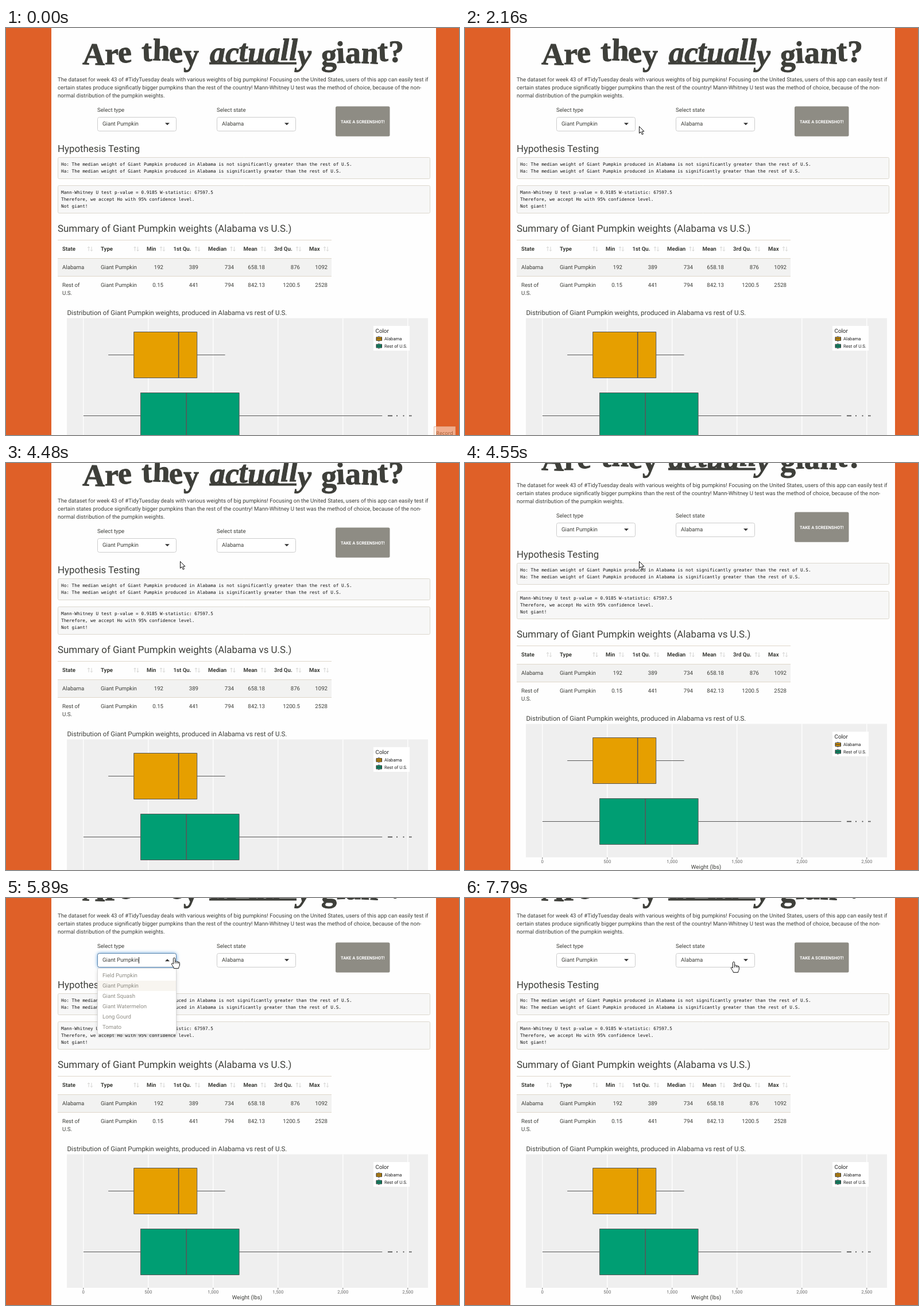
Animation, 789 px wide and 709 px high, one loop 7.99 s. Source, as an HTML page with a canvas:

```html
<!DOCTYPE html>
<html lang="en">
<head>
<meta charset="utf-8">
<title>Are they actually giant?</title>
<style>
  html, body { margin: 0; width: 100%; height: 100%; overflow: hidden; background: #df6028; }
  canvas { display: block; }
</style>
</head>
<body>
<canvas id="stage" width="789" height="709"></canvas>
<script>
const ctx = document.getElementById('stage').getContext('2d');
const LOOP = 7990, STEP = 67;
const INK = '#3e3f3a', RULE = '#dfd7ca', EDGE = '#585858';
const SANS = 'Roboto, sans-serif', MONO = '"DejaVu Sans Mono", monospace';
const BODY = `9.67px ${SANS}`, BOLD = `bold 9.67px ${SANS}`;
const AMBER = '#e69f00', GREEN = '#009e73';

// time, x, y, pointer kind
const POINTER = [
  [530, 772, 699], [640, 764, 696], [800, 764, 696], [1000, 681, 587],
  [1400, 681, 587], [1670, 310, 440], [1870, 100, 262], [2020, 215, 186], [2150, 303, 171],
  [4760, 303, 171], [5030, 309, 87], [5170, 309, 87], [5300, 303, 98],
  [5430, 303, 98], [5490, 293, 104, 'hand'], [6300, 293, 104], [6570, 321, 107],
  [7180, 321, 107], [7380, 363, 107], [7520, 363, 107], [7590, 395, 108, 'hand'], [7780, 468, 111, 'hand']
];
const SCROLL = [[0, 0], [4410, 1], [4480, 24], [4550, 51], [4620, 57], [4690, 59]];

const ARROW = new Path2D('M.5 .5V12.4L3.2 9.8 5.4 14.6 7.4 13.7 5.3 9.1H9Z');
const HAND = new Path2D('M-1.6 11V1.6Q-1.6 .3 0 .3T1.6 1.6V6.4Q3.8 5.4 4.6 7 6.4 6.2 7.2 7.8 9.4 7.2 9.4 9.4V13C9.4 15 7.6 16 7.6 18.7H-.6C-.6 16.6-3.4 14-4.6 11.2-4.9 9.4-3.2 9.3-1.6 11Z');
const KNUCKLES = new Path2D('M1.6 6.4V10M4.6 7V10M7.2 7.8V10.4');

const clamp = v => Math.max(0, Math.min(1, v));
const weightX = lbs => 134.8 + lbs * .226;

function text(s, x, y, font = BODY, color = INK, align = 'left') {
  ctx.font = font;
  ctx.fillStyle = color;
  ctx.textAlign = align;
  ctx.fillText(s, x, y);
}

function rect(x, y, w, h, fill, stroke, r = 0) {
  ctx.beginPath();
  ctx.roundRect(x, y, w, h, r);
  if (fill) { ctx.fillStyle = fill; ctx.fill(); }
  if (stroke) { ctx.strokeStyle = stroke; ctx.stroke(); }
}

function line(x1, y1, x2, y2, color, width = 1) {
  ctx.beginPath();
  ctx.moveTo(x1, y1);
  ctx.lineTo(x2, y2);
  ctx.strokeStyle = color;
  ctx.lineWidth = width;
  ctx.stroke();
  ctx.lineWidth = 1;
}

function title() {
  const lift = { A: 2, r: 2, h: -5, l: -5, t: -3, y: 4, g: 4, '?': -2 };
  const tilt = { A: .04, e: -.08, h: .03, n: .05, t: -.04, i: -.05 };
  const words = [['Are', 133], ['they', 237], ['actually', 355, 'italic '], ['giant?', 549]];
  ctx.strokeStyle = INK;
  for (const [word, left, style = ''] of words) {
    let x = left;
    for (const c of word) {
      ctx.save();
      ctx.translate(x, 61 + (lift[c] || 0));
      ctx.rotate(tilt[c] || 0);
      text(c, 0, 0, `${style}bold 54px "Liberation Serif", serif`);
      ctx.strokeText(c, 0, 0);
      x += ctx.measureText(c).width;
      ctx.restore();
    }
  }
  rect(354, 59.5, 152, 4, INK);
}

function intro() {
  [
    'The dataset for week 43 of #TidyTuesday deals with various weights of big pumpkins! Focusing on the United States, users of this app can easily test if',
    'certain states produce significatly bigger pumpkins than the rest of the country! Mann-Whitney U test was the method of choice, because of the non-',
    'normal distribution of the pumpkin weights.'
  ].forEach((s, i) => text(s, 90, 93 + i * 14));
}

function select(x, label, value, glow, open) {
  text(label, x, 146);
  if (glow) {
    ctx.save();
    ctx.shadowColor = `rgba(80,150,215,${glow})`;
    ctx.shadowBlur = 6;
    rect(x + .5, 155.5, 137, 24, '#fff', null, 3);
    ctx.restore();
  }
  rect(x + .5, 155.5, 137, 24, '#fff', '#cccccc', 3);
  if (glow) {
    ctx.globalAlpha = glow;
    rect(x + .5, 155.5, 137, 24, null, '#5f88b0', 3);
    ctx.globalAlpha = 1;
  }
  text(value, x + 9, 170);
  const d = open ? -2 : 2;
  ctx.beginPath();
  ctx.moveTo(x + 118, 167.3 - d);
  ctx.lineTo(x + 126, 167.3 - d);
  ctx.lineTo(x + 122, 167.3 + d);
  ctx.fillStyle = '#333';
  ctx.fill();
}

function dropdown() {
  ctx.save();
  ctx.shadowColor = 'rgba(0,0,0,.16)';
  ctx.shadowBlur = 7;
  ctx.shadowOffsetY = 3;
  rect(159.5, 181.5, 137, 114.5, '#fff', null, 2);
  ctx.restore();
  rect(159.5, 181.5, 137, 114.5, '#fff', '#d8d8d8', 2);
  rect(160, 203, 136, 18, '#f8f5f0');
  ['Field Pumpkin', 'Giant Pumpkin', 'Giant Squash', 'Giant Watermelon', 'Long Gourd', 'Tomato']
    .forEach((s, i) => text(s, 168, 197 + i * 18, BODY, '#8e8c84'));
}

function block(y, h, lines) {
  rect(90.5, y + .5, 648, h, '#f7f7f7', '#dcd8ce', 2);
  lines.forEach((s, i) => text(s, 96, y + 15 + Math.round(i * 12.2), `7.72px ${MONO}`, '#111'));
}

function tests() {
  text('Hypothesis Testing', 90, 216, `16.85px ${SANS}`);
  block(225, 37, [
    'Ho: The median weight of Giant Pumpkin produced in Alabama is not significantly greater than the rest of U.S.',
    'Ha: The median weight of Giant Pumpkin produced in Alabama is significantly greater than the rest of U.S.'
  ]);
  block(274, 48, [
    'Mann-Whitney U test p-value = 0.9185 W-statistic: 67597.5',
    'Therefore, we accept Ho with 95% confidence level.',
    'Not giant!'
  ]);
}

function sortIcon(x) {
  const c = '#c9c9c7';
  for (const [dx, tip, d] of [[2, 381, 2], [7, 388.5, -2]]) {
    line(x + dx, 381, x + dx, 388.5, c, .8);
    line(x + dx - 2, tip + d, x + dx, tip, c, .8);
    line(x + dx + 2, tip + d, x + dx, tip, c, .8);
  }
}

function table() {
  text('Summary of Giant Pumpkin weights (Alabama vs U.S.)', 90, 355, `16.92px ${SANS}`);
  rect(90, 402, 477, 30, '#f2f2f1');
  for (const y of [369.5, 401.5, 432.5]) line(90, y, 567, y, RULE);
  // heading, left, icon left, value right, two values
  [
    ['State', 98, 142, 0, 'Alabama', 'Rest of'],
    ['Type', 165, 222.5, 0, 'Giant Pumpkin', 'Giant Pumpkin'],
    ['Min', 245, 268, 274, '192', '0.15'],
    ['1st Qu.', 291.5, 329, 335, '389', '441'],
    ['Median', 352, 390.5, 397, '734', '794'],
    ['Mean', 413.5, 444, 451, '658.18', '842.13'],
    ['3rd Qu.', 467, 505, 512, '876', '1200.5'],
    ['Max', 528, 553, 560, '1092', '2528']
  ].forEach(([head, x, icon, right, a, b]) => {
    text(head, x, 388, BOLD);
    sortIcon(icon);
    const align = right ? 'right' : 'left';
    text(a, right || x, 420, BODY, INK, align);
    text(b, right || x, 451, BODY, INK, align);
  });
  text('U.S.', 98, 465);
}

function boxplot(y, stats, fill) {
  const [lo, q1, mid, q3, hi] = stats.map(weightX);
  line(lo, y, q1, y, EDGE);
  line(q3, y, hi, y, EDGE);
  rect(q1, y - 40, q3 - q1, 80, fill, EDGE);
  line(mid, y - 40, mid, y + 40, EDGE, 1.6);
}

function legendKey(y, fill, label) {
  line(649.5, y - 5, 649.5, y + 5, '#333');
  rect(645, y - 3, 9.5, 6, fill, '#333');
  line(645, y, 654.5, y, '#333', 1.3);
  text(label, 659, y + 2.8, `7.7px ${SANS}`, '#222');
}

function chart() {
  text('Distribution of Giant Pumpkin weights, produced in Alabama vs rest of U.S.', 106.5, 500, `11.58px ${SANS}`);
  rect(106, 505.5, 629, 232.5, '#efefef');
  for (let lbs = 0; lbs <= 2500; lbs += 500) {
    const x = weightX(lbs);
    line(x, 505.5, x, 738, '#fff', 1.3);
    line(x, 738, x, 741, '#777');
    text(lbs.toLocaleString('en-US'), x, 748.3, `7.8px ${SANS}`, '#666', 'center');
  }
  text('Weight (lbs)', 420, 757.5, `9.8px ${SANS}`, INK, 'center');
  boxplot(569.5, [192, 389, 734, 876, 1092], AMBER);
  boxplot(675.5, [.15, 441, 794, 1200.5, 2303], GREEN);
  ctx.fillStyle = '#444';
  for (const x of [666, 668, 670, 672, 681, 692.5, 703.2, 705.5]) {
    ctx.beginPath();
    ctx.arc(x, 675.5, 1.1, 0, 7);
    ctx.fill();
  }
  rect(640, 519, 63, 43, '#fff');
  text('Color', 643.5, 531, `9.8px ${SANS}`, '#222');
  legendKey(541.5, AMBER, 'Alabama');
  legendKey(554, GREEN, 'Rest of U.S.');
}

function page(t) {
  const open = t >= 5700 && t < 7110;
  const glow = t < 7110 ? clamp((t - 5640) / 200) : clamp(1 - (t - 7050) / 270);
  title();
  intro();
  select(159, 'Select type', 'Giant Pumpkin', glow, open);
  select(367, 'Select state', 'Alabama');
  rect(574, 136.5, 94.5, 52.3, '#8e8c84', null, 2.5);
  text('TAKE A SCREENSHOT!', 621.3, 165.7, `bold 7.5px ${SANS}`, '#fff', 'center');
  tests();
  table();
  chart();
  if (open) {
    dropdown();
    if (t < 6300 || t >= 6840) line(231.5, 162, 231.5, 173, '#222');
  }
}

function tooltip(t) {
  if (t >= 130) return;
  ctx.globalAlpha = t < 70 ? 1 : .5;
  rect(745.5, 694.5, 37, 20, 'rgba(255,236,222,.55)', 'rgba(225,170,140,.8)');
  text('Record', 764, 709, '9px "Open Sans", sans-serif', '#a3582f', 'center');
  ctx.globalAlpha = 1;
}

function pointer(t) {
  const i = POINTER.findLastIndex(k => t >= k[0]);
  if (i < 0) return;
  const a = POINTER[i], b = POINTER[i + 1] || a;
  // the picture advances in even ticks within each move
  const u = a === b ? 1 : clamp((Math.floor((t - a[0]) / STEP) + 1) * STEP / (b[0] - a[0]));
  const hand = a[3];
  const shape = hand ? HAND : ARROW;
  ctx.save();
  ctx.translate(Math.round(a[1] + (b[1] - a[1]) * u), Math.round(a[2] + (b[2] - a[2]) * u));
  ctx.fillStyle = '#fff';
  ctx.strokeStyle = '#111';
  ctx.fill(shape);
  ctx.stroke(shape);
  if (hand) ctx.stroke(KNUCKLES);
  ctx.restore();
}

const start = performance.now();
function frame() {
  const t = (performance.now() - start) % LOOP;
  ctx.textRendering = 'geometricPrecision';
  rect(0, 0, 789, 709, '#df6028');
  rect(79, 0, 670, 709, '#fefefe');
  ctx.save();
  ctx.translate(0, -SCROLL.findLast(k => t >= k[0])[1]);
  page(t);
  ctx.restore();
  tooltip(t);
  pointer(t);
  requestAnimationFrame(frame);
}
frame();
</script>
</body>
</html>
```
